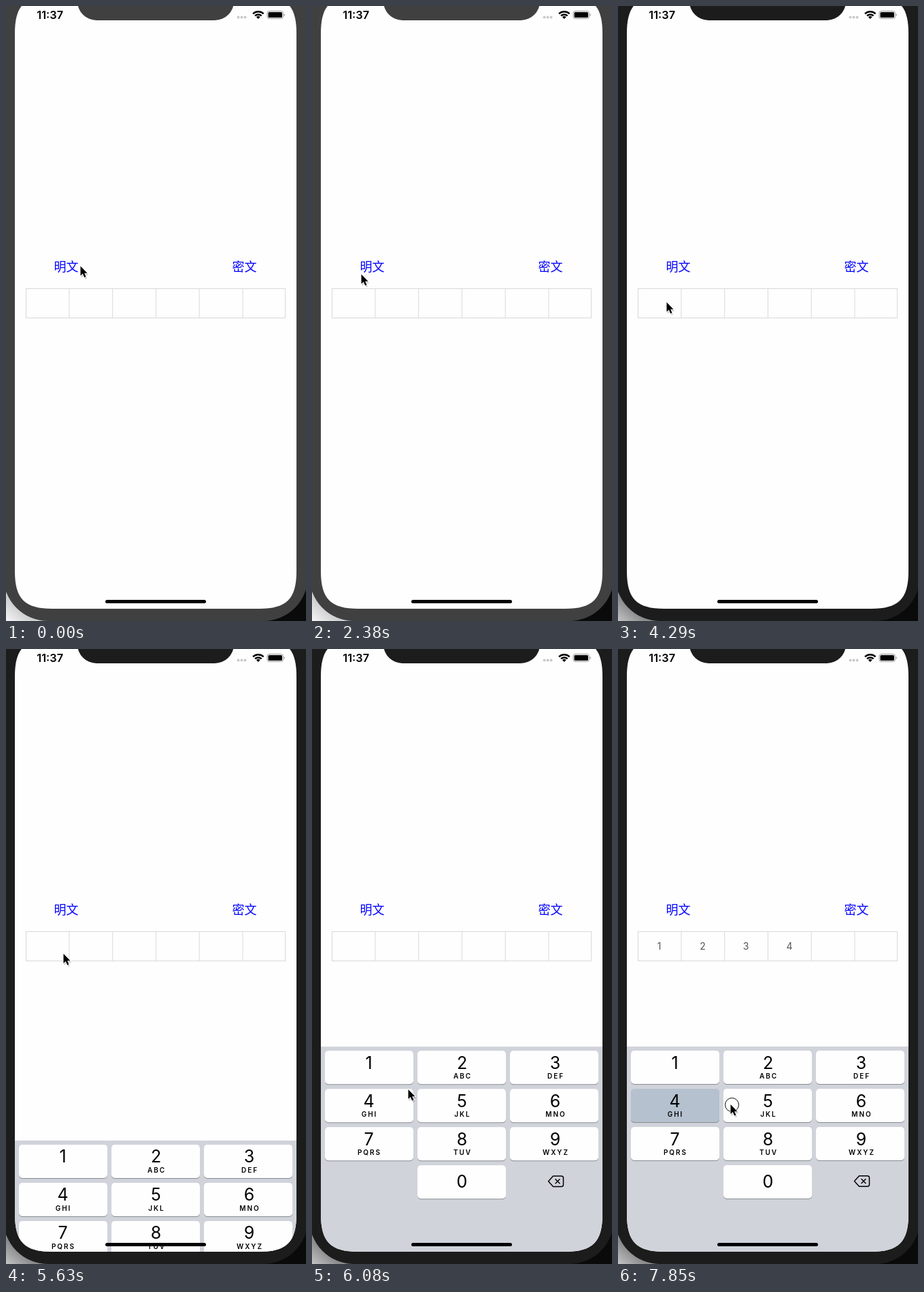
These frames come from a looping animation (441x902 px, 8000 ms). An HTML page:

```html
<!DOCTYPE html>
<html lang="zh-CN">
<head>
<meta charset="utf-8">
<title>PIN entry</title>
<style>
  html, body { margin: 0; width: 100%; height: 100%; overflow: hidden; background: #0a0a0a; }
  svg { display: block; width: 441px; height: 902px; font-family: Inter, Roboto, sans-serif; }
  text { text-anchor: middle; }
  .label { font: 18px "Noto Sans CJK SC", "Noto Sans CJK", sans-serif; fill: #00f; }
  .digit { font-size: 25px; }
  .letters { font-size: 10px; font-weight: 600; letter-spacing: 2px; }
  .typed { font-size: 14px; fill: #555; }
  .line { fill: none; stroke: #000; }
</style>
</head>
<body>
<svg viewBox="0 0 441 902">
  <defs>
    <linearGradient id="desk" gradientUnits="userSpaceOnUse" x1="0" y1="902" x2="17" y2="882">
      <stop id="deskNear" /><stop id="deskFar" offset="1" />
    </linearGradient>
    <path id="screen" d="M13 40C13-.5 27.5-15 68-15H372C412.5-15 427-.5 427 40V829C427 869.5 412.5 884 372 884H68C27.5 884 13 869.5 13 829Z" />
    <clipPath id="screenClip"><use href="#screen" /></clipPath>
  </defs>

  <rect width="220" height="902" fill="url(#desk)" />
  <rect x="220" width="221" height="902" fill="#0a0a0a" />
  <g id="body">
    <rect x="-4" y="-80" width="448" height="982" rx="66" />
    <use href="#screen" fill="#fefefe" />
    <path d="M105-7A28 28 0 0 0 133 21H307A28 28 0 0 0 335-7Z" />
  </g>

  <text x="64.700" y="18.500" font-size="16.300" font-weight="600">11:37</text>
  <path d="M341.500 16.500h15" stroke="#c9c9c9" stroke-width="4" stroke-linecap="round" stroke-dasharray="0 5" />
  <g class="line" stroke-width="2.400">
    <path d="M363 11.300A11.500 11.500 0 0 1 378.600 11.300" />
    <path d="M366 14.400A7 7 0 0 1 375.600 14.400" />
  </g>
  <path d="M370.800 19L368 16.200A4 4 0 0 1 373.600 16.200Z" />
  <rect x="384" y="7.500" width="23.500" height="11" rx="3" class="line" style="stroke: #999" />
  <rect x="385.500" y="9" width="20.500" height="8" rx="1.600" />
  <path d="M408.800 11a2.200 2.200 0 0 1 0 4z" fill="#999" />

  <text class="label" x="88.500" y="388.500">明文</text>
  <text class="label" x="350.500" y="388.500">密文</text>
  <rect x="29.500" y="414.500" width="381" height="43" fill="none" stroke="#d9d9d9" />
  <g id="cells"></g>

  <g clip-path="url(#screenClip)">
    <g id="keyboard">
      <rect x="13" y="583" width="414" height="302" fill="#d0d3da" />
      <g id="keys"></g>
      <path class="line" stroke-width="1.500" stroke-linejoin="round" stroke-linecap="round"
        d="M354.500 772.700h12q3 0 3 3v9.600q0 3-3 3h-12l-7-7.800zM358 777.500l6 6m0-6l-6 6" />
    </g>
  </g>
  <rect x="146" y="871" width="148" height="5" rx="2.500" />

  <g id="pointer">
    <circle id="touch" cx="2" cy=".5" r="10" fill="#fff" fill-opacity=".3" stroke="#000" />
    <path d="M1 2V17L4.500 14L7 19L9.500 18L7.500 13H12Z" opacity=".2" />
    <path d="M0 0V14L3.300 11L5.600 16.500L8 15.500L5.700 10.300H10Z" stroke="#fff" stroke-width="1.600" paint-order="stroke" />
  </g>
</svg>
<script>
const LOOP = 8000, TICKS = 54;       // the screen refreshes in coarse ticks
const FOCUS = 21, KEYBOARD = 37.33;  // ticks
const TOUCH_TICKS = 2;
const $ = id => document.getElementById(id);

function add(parent, tag, attrs, text = '') {
  const el = document.createElementNS('http://www.w3.org/2000/svg', tag);
  for (const name in attrs) el.setAttribute(name, attrs[name]);
  el.textContent = text;
  return parent.appendChild(el);
}

const keys = {};
const letters = ' ABC DEF GHI JKL MNO PQRS TUV WXYZ'.split(' ');
function addKey(digit, col, row) {
  const x = 19 + col * 136, y = 589 + row * 56;
  const center = 83.5 + col * 137;
  add($('keys'), 'rect', { x, y: y + 1, width: 130, height: 49, rx: 5, fill: '#888b90' });
  keys[digit] = add($('keys'), 'rect', { x, y, width: 130, height: 49, rx: 5 });
  add($('keys'), 'text', { class: 'digit', x: center, y: y + (digit ? 26.5 : 33) }, digit);
  if (digit) add($('keys'), 'text', { class: 'letters', x: center + 1, y: y + 41 }, letters[digit - 1]);
}
for (let i = 0; i < 9; i++) addKey(i + 1, i % 3, Math.floor(i / 3));
addKey(0, 1, 3);

const cells = [];
for (let i = 0; i < 6; i++) {
  const x = 29.2 + i * 63.75;
  if (i) add($('cells'), 'path', { d: `M${x} 415v42`, stroke: '#d9d9d9' });
  cells.push(add($('cells'), 'text', { class: 'typed', x: x + 31.5, y: 441 }));
}

// Pointer moves: leaving tick, arrival tick, destination, and what it touches there.
const moves = [
  [0, 0, 109.5, 381.5],
  [0, 2, 96.5, 384],
  [3, 8, 62.5, 437],
  [15, 16, 72.5, 393.5],
  [16, 18, 82, 369.5],
  [21, 29, 71.5, 434.5],
  [36, 36, 71.5, 434.5, 'field'],
  [36, 38, 84.5, 447],
  [38, 41, 141.5, 646],
  [41, 44, 96, 607, 1],
  [44, 47, 214.5, 608, 2],
  [47, 49, 340, 612, 3],
  [49, 52, 125, 668, 4],
  [52, 53, 165.5, 668]
];
const touches = moves.filter(move => move[4]).map(move => ({ at: move[1], target: move[4] }));

function pointerAt(tick) {
  const i = moves.findLastIndex(move => move[0] <= tick);
  const [leave, arrive, x, y] = moves[i];
  const [, , fromX, fromY] = moves[Math.max(0, i - 1)];
  const p = arrive > leave ? Math.min(1, (tick - leave) / (arrive - leave)) : 1;
  const eased = p * p * (3 - 2 * p);
  return [fromX + (x - fromX) * eased, fromY + (y - fromY) * eased];
}

// Critically damped slide from below the screen.
function keyboardOffset(tick) {
  const s = Math.max(0, tick - KEYBOARD) * 2.71;
  return 301 * (1 + s) * Math.exp(-s);
}

function render(tick) {
  const focused = tick >= FOCUS;
  $('body').setAttribute('fill', focused ? '#1c1c1c' : '#404040');
  $('deskNear').setAttribute('stop-color', focused ? '#c4c4c6' : '#f6f6f8');
  $('deskFar').setAttribute('stop-color', focused ? '#8c8c8e' : '#cfcfd2');
  $('keyboard').setAttribute('transform', `translate(0 ${keyboardOffset(tick).toFixed(1)})`);
  $('pointer').setAttribute('transform', `translate(${pointerAt(tick)})`);

  const touch = touches.find(({ at }) => tick >= at && tick < at + TOUCH_TICKS);
  $('touch').style.display = touch ? '' : 'none';
  for (const digit in keys) {
    keys[digit].setAttribute('fill', touch && +digit === touch.target ? '#b5c1cf' : '#fefefe');
  }
  const entered = touches.filter(({ at, target }) => target in keys && tick > at);
  cells.forEach((cell, i) => cell.textContent = entered[i] ? entered[i].target : '');
}

const start = performance.now();
function frame() {
  const time = (performance.now() - start) % LOOP;
  // A small lead absorbs the rounding of the tick times.
  render(Math.min(TICKS - 1, Math.floor((time + 10) * TICKS / LOOP)));
  requestAnimationFrame(frame);
}
frame();
</script>
</body>
</html>
```
